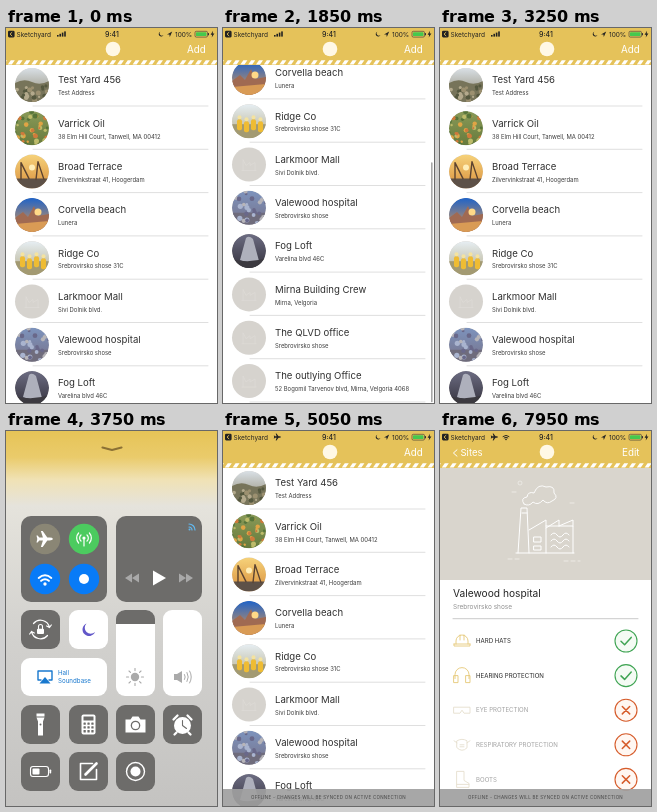
Write an HTML page that moves like this. It is 211 px wide and 375 px high and loops after 8 s.

```html
<!DOCTYPE html>
<html lang="en">
<head>
<meta charset="utf-8">
<title>Site list</title>
<style>
html, body { margin: 0; width: 100%; height: 100%; overflow: hidden; background: #fff; }
svg { display: block; width: 100vw; height: 100vh; font-family: Inter, Roboto, sans-serif; }
</style>
</head>
<body>
<svg id="stage" viewBox="0 0 211 375"></svg>
<script>
const LOOP = 8000, PITCH = 43.3, END = 137, GOLD = '#e5c25a', DARK = '#6d6c6a';

const rect = (x, y, w, h, fill, r = 0, more = '') =>
  `<rect x="${x}" y="${y}" width="${w}" height="${h}" rx="${r}" fill="${fill}" ${more}/>`;
const circle = (x, y, r, fill, more = '') => `<circle cx="${x}" cy="${y}" r="${r}" fill="${fill}" ${more}/>`;
const path = (d, fill, more = '') => `<path d="${d}" fill="${fill}" ${more}/>`;
const line = (d, stroke, w = 1, more = '') =>
  `<path d="${d}" fill="none" stroke="${stroke}" stroke-width="${w}" stroke-linecap="round" stroke-linejoin="round" ${more}/>`;
const text = (s, x, y, size, fill, more = '') =>
  `<text x="${x}" y="${y}" font-size="${size}" fill="${fill}" ${more}>${s}</text>`;
const group = (id, body, more = '') => `<g id="${id}" ${more}>${body}</g>`;
const at = (x, y, body, s = 1) => `<g transform="translate(${x} ${y}) scale(${s})">${body}</g>`;
const gradient = (id, stops) => `<linearGradient id="${id}" x2="0" y2="1">` +
  stops.map(([o, c]) => `<stop offset="${o}" stop-color="${c}"/>`).join('') + '</linearGradient>';

let seed = 7;
const rnd = () => (seed = seed * 16807 % 2147483647) / 2147483647;
const dots = (n, colors, top = -17) => Array.from({ length: n }, (_, i) =>
  circle((rnd() * 34 - 17).toFixed(1), (top + rnd() * (17 - top)).toFixed(1), (1 + rnd() * 1.6).toFixed(1), colors[i % colors.length])).join('');

// Photo thumbnails: sky colour, ground colour and a few shapes
const photos = {
  yard: ['#d9e0e6', '#8a8268', () => path('M-17 -2Q-8 -7 0 -3T17 -4V17H-17Z', '#77745a') + dots(26, ['#9c9070', '#55583f', '#b3a98c'], 0)],
  orchard: ['#8a9a58', '#667a3c', () => dots(48, ['#e0a445', '#56743a', '#bdbb6a', '#cf7a3c'])],
  crane: ['#f6d27a', '#d98f3c', () => path('M-17 7H17V17H-17Z', '#5d5148') + line('M-11 8V-9L-3 7M4 8L6 -10L12 8', '#5c4330', 1.4) + circle(0, -4, 3, '#ffeeb8')],
  beach: ['#1f63c8', '#e59a4c', () => path('M-17 3L-9 -3L-4 2L2 -9L6 1L17 -1V17H-17Z', '#a06a52') + circle(6, -3, 3.5, '#ffd987') + path('M-17 9L17 6V17H-17Z', '#d99b55')],
  crew: ['#e6eef3', '#b5ad8a', () => rect(-17, 3, 34, 14, '#a39a72') + [-12, -5, 2, 9].map((x, i) => rect(x, -2 + i % 2 * 2, 5, 11, '#efbc33', 2) + circle(x + 2.5, -4 + i % 2 * 2, 2, '#f4e3a0')).join('')],
  tower: ['#7d93bd', '#77738a', () => path('M-17 5H17V17H-17Z', '#6f6c7c') + dots(34, ['#a9b4cf', '#69688a', '#b7b5b9'])],
  arch: ['#6c6c82', '#35333e', () => path('M-3 -13Q0 -16 4 -12L10 10Q2 14 -9 9Z', '#aeb0bc') + path('M-17 8Q0 13 17 7V17H-17Z', '#3c3a40')],
  site: ['#dbe1e3', '#7a6f5a', () => path('M-17 1Q-5 -6 17 -1V17H-17Z', '#6e6655') + dots(22, ['#a99673', '#504e45', '#c1b79e'], 1)]
};
const thumbDefs = Object.entries(photos).map(([k, [a, b]]) => gradient('sky-' + k, [[0, a], [1, b]])).join('');
const photo = k => `<g clip-path="url(#disc)">${circle(0, 0, 17, `url(#sky-${k})`)}${photos[k][2]()}</g>`;
const blank = circle(0, 0, 17, '#d6d3ce') + line('M-7 6H7M-6 6V-5L-3 1L1 -2V1L6 -2V6', '#dfdcd7', .7);

const sites = [
  ['Test Yard 456', 'Test Address', 'yard'],
  ['Varrick Oil', '38 Elm Hill Court, Tanwell, MA 00412', 'orchard'],
  ['Broad Terrace', 'Zilvervinkstraat 41, Hoogerdam', 'crane'],
  ['Corvella beach', 'Lunera', 'beach'],
  ['Ridge Co', 'Srebrovirsko shose 31C', 'crew'],
  ['Larkmoor Mall', 'Sivi Dolnik blvd.'],
  ['Valewood hospital', 'Srebrovirsko shose', 'tower'],
  ['Fog Loft', 'Varelina blvd 46C', 'arch'],
  ['Mirna Building Crew', 'Mirna, Velgoria', 'site'],
  ['The QLVD office', 'Srebrovirsko shose'],
  ['The outlying Office', '52 Bogomil Tarvenov blvd, Mirna, Velgoria 4068']
];
const list = sites.map(([name, place, pic], i) => at(0, i * PITCH,
  at(26, 57, blank + (pic ? group(pic, photo(pic)) : '')) +
  text(name, 52, 55.4, 9.6, '#303030') + text(place, 52, 67.3, 5.9, '#3c3c3c') +
  line('M27 78H202', '#d2d2d2', .7))).join('');

const plane = path('M0 -7Q1.3 -6.5 1.3 -4V-2L7 2V3.6L1.3 1.8V5L3 6.4V7.4L0 6.7L-3 7.4V6.4L-1.3 5V1.8L-7 3.6V2L-1.3 -2V-4Q-1.3 -6.5 0 -7Z', 'currentColor', 'transform="rotate(90)"');
const wifi = line('M-6 -2Q0 -7 6 -2M-3.7 .8Q0 -2.3 3.7 .8', 'currentColor', 1.9) + circle(0, 3.8, 1.6, 'currentColor');
const moon = path('M-2 -6A6.5 6.5 0 1 0 6.5 2.5A6 6 0 0 1 -2 -6Z', 'currentColor');

function header() {
  let stripes = '';
  for (let x = -6; x < 215; x += 7.8) stripes += `M${x + 3} 32.3h4l-3 4.2h-4Z`;
  const status = rect(2, 2.8, 6.6, 6.6, '#222', 1.3) + line('M5.9 4.4L4 6.1L5.9 7.8', GOLD, .9) +
    text('Sketchyard', 10.5, 8.5, 6.5, '#222') +
    group('signal', [0, 1, 2, 3].map(i => rect(51 + i * 2.4, 7 - i * 1.2, 1.6, 1.6 + i * 1.2, '#222')).join('')) +
    group('flight', at(54.5, 6, plane, .5)) + group('wifi', at(66, 6.5, wifi, .5)) +
    text('9:41', 106, 8.6, 7, '#222', 'text-anchor="middle" font-weight="500"') +
    at(155, 6, moon, .38) + path('M161 6.4L166.2 3.6L163.8 8.9L163.4 6.5Z', '#222') +
    text('100%', 169, 8.5, 6.5, '#222') +
    rect(189, 3.3, 12.5, 5.8, 'none', 1.3, 'stroke="#333" stroke-width=".6"') + rect(190, 4.3, 10.5, 3.8, '#45c94e', .6) +
    rect(202, 5.1, 1, 2.2, '#333') + path('M207 2.8L204.6 6.7H206.2L205.7 9.6L208.4 5.6H206.7Z', '#222');
  return rect(0, 0, 211, 37, GOLD) + path(stripes, '#fff') + circle(107, 21, 7.3, '#fff8e5') +
    group('listNav', text('Add', 181, 25.4, 9.8, '#fff')) +
    group('pageNav', line('M17 18.8L13.4 22L17 25.2', '#fff', 1) + text('Sites', 20.5, 25.4, 9.5, '#fff') + text('Edit', 182, 25.4, 9.8, '#fff')) +
    `<g color="#222">${status}</g>`;
}

function detail() {
  const factory = line('M76 122H134M78 122L81 77H87L89 122M89 99L106 89V122M106 95H133V122M106 97L119 89V95M119 95L133 89V95' +
    'M82 82H87M111 104Q114 100 117 104T123 104T129 104M111 110Q114 106 117 110T123 110T129 110M111 116Q114 112 117 116T123 116T129 116' +
    'M94 106H101V111H94ZM94 115H101V119H94Z', '#fff', 1) +
    line('M84 73Q80 67 87 66Q88 60 94 62Q98 52 106 56Q115 54 114 62Q119 67 112 70Q107 74 103 69Q98 75 93 71Q89 76 84 73', '#fff', .9) +
    line('M68 128H82M124 130H140M72 61H77M130 72H136', '#f1efeb', .8, 'stroke-dasharray="4 3"') + circle(80, 52, 2, 'none', 'stroke="#f1efeb" stroke-width=".7"');
  const icons = [
    'M-8 3H8M-6 3V0A6 6 0 0 1 6 0V3M-2 -6V-1M2 -6V-1M-8 3V5H8V3',
    'M-7 3V-1A7 7 0 0 1 7 -1V3M-8 0H-4V7H-8ZM4 0H8V7H4Z',
    'M-8 -3H8V3H2L0 0L-2 3H-8Z',
    'M-5 -4Q0 -7 5 -4V3Q0 8 -5 3ZM-8 -4L-5 -2M8 -4L5 -2M-2 0H2M-2 2H2',
    'M-5 -8H2V1L7 4V8H-5ZM-5 5H7'
  ];
  const gear = ['HARD HATS', 'HEARING PROTECTION', 'EYE PROTECTION', 'RESPIRATORY PROTECTION', 'BOOTS'];
  const items = gear.map((name, i) => {
    const on = i < 2, color = on ? '#3fa453' : '#d65c2b';
    return at(0, 210 + i * 34.6, at(22, 0, line(icons[i], on ? '#e6c979' : '#e6dfcf', .9)) +
      text(name, 36, 2.2, 6.1, on ? '#282828' : '#a2a2a2') +
      circle(186, 0, 11, on ? '#f4fbf4' : '#fff7f2', `stroke="${color}" stroke-width="1.1"`) +
      line(on ? 'M181 .3L184.6 3.8L191.2 -3.6' : 'M182.3 -3.7L189.7 3.7M189.7 -3.7L182.3 3.7', color, 1.5));
  }).join('');
  return rect(0, 37, 211, 338, '#fff') + rect(0, 37, 211, 112, '#d9d5cd') + factory +
    text('Valewood hospital', 13, 165.6, 10.2, '#262626') + text('Srebrovirsko shose', 13, 178.3, 6.5, '#909090') +
    line('M13 187.7H198', '#bdbdbd', .8) + items;
}

function controls() {
  const tile = (x, y, body, fill = DARK) => rect(x, y, 39, 39, fill, 9) + at(x + 19.5, y + 19.5, body);
  const w = '#fff';
  const lock = line('M-7 -6A9.2 9.2 0 0 1 9 -2M7 6A9.2 9.2 0 0 1 -9 2M9 -2L10.8 -4.5M9 -2L6.2 -3.5M-9 2L-10.8 4.5M-9 2L-6.2 3.5', w, 1.2) +
    rect(-3.5, -.7, 7, 5.3, w, 1) + line('M-2 -1V-3A2 2 0 0 1 2 -3V-1', w, 1.1);
  const torch = path('M-4 -11H4V-8H-4ZM-4 -7H4L2.5 -3V11H-2.5V-3Z', w) + circle(0, 0, 1, DARK);
  let keys = rect(-7, -10, 14, 20, w, 2) + rect(-5, -8, 10, 4, DARK);
  for (let i = 0; i < 9; i++) keys += rect(-5 + i % 3 * 3.9, -2 + (i / 3 | 0) * 3.8, 2.3, 2.3, DARK, .5);
  const camera = path('M-10 -5H-5L-3 -8H3L5 -5H10V8H-10Z', w) + circle(0, 1, 4.8, DARK) + circle(0, 1, 3.5, w);
  const alarm = circle(0, 1, 8.5, w) + line('M0 -4V1L4 4', DARK, 1.1) + line('M-9 -5L-5 -9M9 -5L5 -9M-6 8L-8 10M6 8L8 10', w, 2.3);
  const battery = rect(-10, -5, 18, 10, 'none', 2.5, 'stroke="#fff" stroke-width="1.1"') + rect(-8, -3, 7, 6, w, 1) + rect(9, -2, 1.7, 4, w, .7);
  const note = line('M4 -8H-8V8H8V-2', w, 1.6) + line('M-3 3L8 -8', w, 2.6);
  const record = circle(0, 0, 9, 'none', 'stroke="#fff" stroke-width="1.4"') + circle(0, 0, 5, w);
  const rays = Array.from({ length: 8 }, (_, i) => line('M0 -6.4V-8.5', '#aaa', 1.1, `transform="rotate(${i * 45})"`)).join('');
  const skip = path('M-7 0L0 -4.4V4.4ZM0 0L7 -4.4V4.4Z', '#a9a9a9');
  const radio = line('M0 0V8M-3 -3A4 4 0 0 0 -3 3M3 -3A4 4 0 0 1 3 3M-5.4 -5A7.4 7.4 0 0 0 -5.4 5M5.4 -5A7.4 7.4 0 0 1 5.4 5', w, 1.2) + circle(0, 0, 1.6, w);
  const body = rect(15, 85, 86, 86, DARK, 10) + rect(110, 85, 86, 86, DARK, 10) +
    '<circle id="planeKey" cx="39" cy="108" r="15.2"/>' + `<g color="#fff">${at(39, 108, plane, 1.15)}</g>` +
    '<circle id="cellKey" cx="78" cy="108" r="15.2"/>' + at(78, 107, radio) +
    circle(39, 148, 15.2, '#087bf7') + `<g color="#fff">${at(39, 149, wifi, 1.05)}</g>` +
    circle(78, 148, 15.2, '#087bf7') + circle(78, 148, 5, w) +
    at(185, 97, line('M-2 -4A6 6 0 0 1 4 2M-2 -1A3 3 0 0 1 1 2', '#62b8ef', 1.2) + circle(-1.5, 1.5, 1, '#62b8ef')) +
    at(126, 147, skip) + path('M147 139.5L160 147L147 154.5Z', w) + at(180, 147, `<g transform="scale(-1 1)">${skip}</g>`) +
    tile(15, 179, lock) + tile(63, 179, `<g color="#6257c8">${moon}</g>`, w) +
    `<g clip-path="url(#slider)">${rect(110, 179, 39, 86, w) + rect(110, 179, 39, 14, DARK)}</g>` +
    at(129, 246, circle(0, 0, 4.2, '#aaa') + rays) + rect(157, 179, 39, 86, w, 9) +
    at(176, 246, path('M-8 -3H-5L0 -6V6L-5 3H-8Z', '#aaa') + line('M2.5 -2.5Q4 0 2.5 2.5M5 -4.5Q7.6 0 5 4.5M7.6 -6Q11 0 7.6 6', '#aaa', 1)) +
    rect(15, 227, 86, 38, w, 9) + at(39, 246, line('M-4 3H-7V-6H7V3H4', '#1878ce', 1.4) + path('M0 0L5.5 6.5H-5.5Z', '#1878ce')) +
    text('Hall', 52, 244.3, 6.2, '#1878ce') + text('Soundbase', 52, 252.3, 6.2, '#1878ce') +
    tile(15, 274, torch) + tile(63, 274, keys) + tile(110, 274, camera) + tile(157, 274, alarm) +
    tile(15, 321, battery) + tile(63, 321, note) + tile(110, 321, record);
  return rect(0, 0, 211, 375, 'url(#haze)') + line('M96.5 16.5L106 19L115.5 16.5', '#8b7135', 2.2) + group('tiles', body);
}

const $ = id => document.getElementById(id);
$('stage').innerHTML = '<defs>' + thumbDefs +
  gradient('haze', [[0, '#e6c457'], [.07, '#eacb6b'], [.13, '#f0e2b5'], [.2, '#e5e3dc'], [.55, '#d2d1ce'], [1, '#c4c3c1']]) +
  `<clipPath id="disc">${circle(0, 0, 17, '#000')}</clipPath><clipPath id="slider">${rect(110, 179, 39, 86, '#000', 9)}</clipPath></defs>` +
  rect(0, 0, 211, 375, '#fff') +
  group('home', group('list', list) + rect(208, 37, 1.6, 240, '#a6a6a6', .8, 'id="thumb"')) +
  group('page', detail()) + header() +
  group('offline', rect(0, 358, 211, 17, '#a0a0a0', 0, 'opacity=".92"') +
    text('OFFLINE - CHANGES WILL BE SYNCED ON ACTIVE CONNECTION', 105.5, 368.2, 4.5, '#454545', 'text-anchor="middle" letter-spacing=".26"')) +
  group('controls', controls());

// Value between [time, value] keys, slowing down towards each key
function track(t, keys) {
  let [t0, v0] = keys[0];
  for (const [t1, v1] of keys) {
    if (t < t1) {
      const left = 1 - Math.max(0, (t - t0) / (t1 - t0));
      return v1 + (v0 - v1) * left ** 3;
    }
    [t0, v0] = [t1, v1];
  }
  return v0;
}
const move = (id, x, y) => $(id).setAttribute('transform', `translate(${x.toFixed(2)} ${y.toFixed(2)})`);
const fade = (id, v) => {
  $(id).setAttribute('opacity', v.toFixed(3));
  $(id).setAttribute('display', v > 0 ? 'inline' : 'none');
};

function draw(t) {
  const scroll = track(t, [[950, 0], [1800, END], [2050, END], [2800, 0], [5150, 0], [5950, END]]);
  const open = track(t, [[3320, 0], [3700, 1], [4450, 1], [4900, 0]]);
  const push = track(t, [[6750, 0], [7400, 1]]);
  const airborne = t >= 4150;

  move('list', 0, -scroll);
  move('thumb', 0, scroll * 338 / 476);
  fade('thumb', track(t, [[920, 0], [1000, 1], [2800, 1], [3100, 0], [5120, 0], [5220, 1], [6300, 1], [6550, 0]]));
  fade('site', track(t, [[1950, 0], [2100, 1]]));

  move('home', -65 * push, 0);
  move('page', 211 * (1 - push), 0);
  fade('page', push > 0 ? 1 : 0);
  fade('listNav', 1 - push);
  fade('pageNav', push);

  fade('signal', airborne ? 0 : 1);
  fade('flight', airborne ? 1 : 0);
  fade('wifi', t >= 5400 ? 1 : 0);
  fade('offline', track(t, [[4500, 0], [4750, 1]]));

  fade('controls', open);
  move('tiles', 0, 60 * (1 - open));
  $('planeKey').setAttribute('fill', airborne ? '#f59a23' : '#8a8675');
  $('cellKey').setAttribute('fill', airborne ? '#8a8675' : '#4ccb5f');
}

const start = performance.now();
function tick() {
  draw((performance.now() - start) % LOOP);
  requestAnimationFrame(tick);
}
tick();
</script>
</body>
</html>
```
